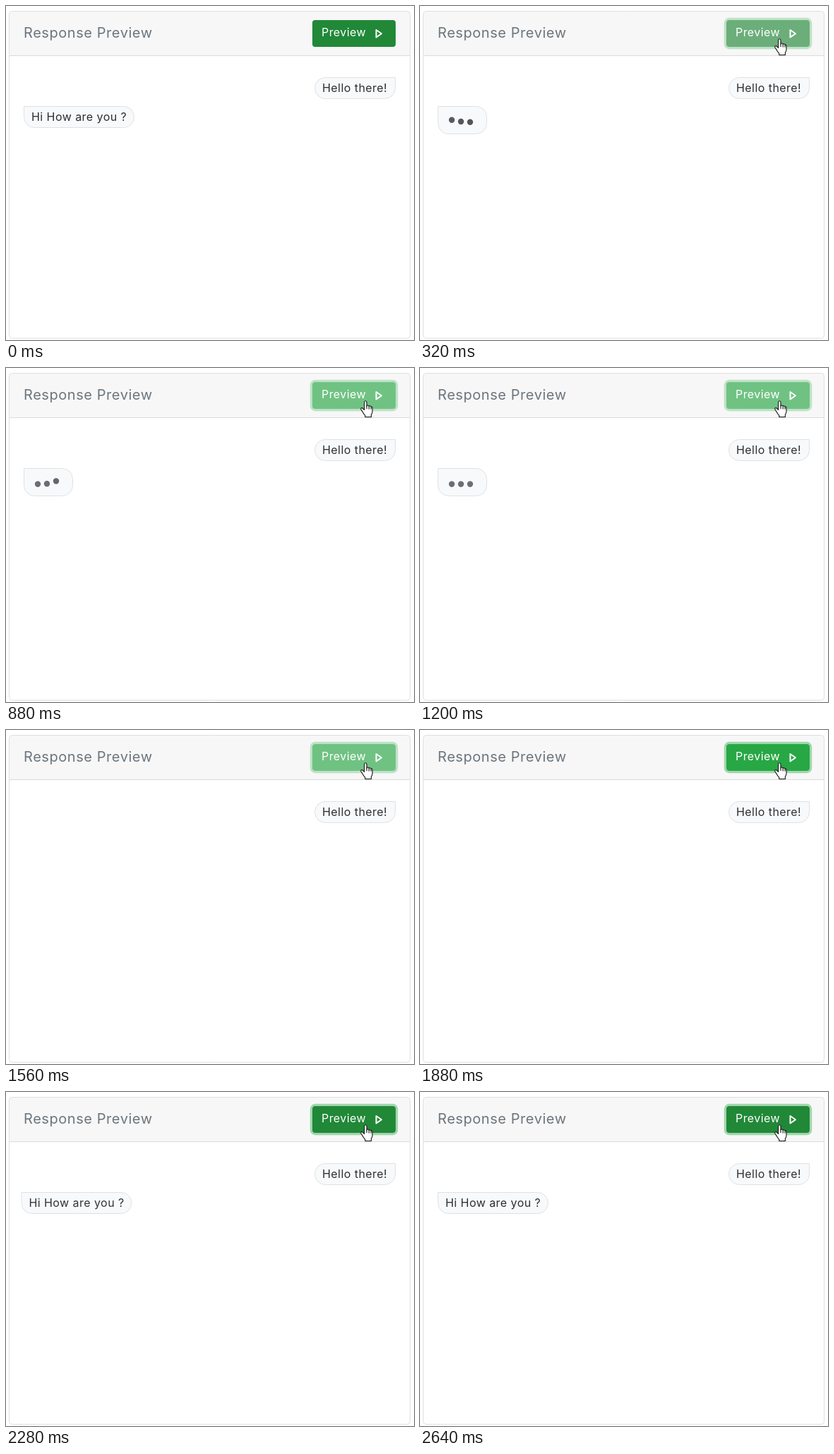
These frames come from a looping animation (578x474 px, 2680 ms). An HTML page with a canvas:

```html
<!DOCTYPE html>
<html lang="en">
<head>
<meta charset="utf-8">
<title>Response Preview</title>
<style>
  html, body { margin: 0; width: 578px; height: 474px; overflow: hidden; background: #fff; }
  canvas { display: block; }
</style>
</head>
<body>
<canvas id="stage" width="578" height="474"></canvas>
<script>
const ctx = document.getElementById('stage').getContext('2d');
const LOOP = 2680, CLICK = 40, DISABLED = 400, TYPED = 1520, REPLY = 1878;

const clamp = v => Math.min(1, Math.max(0, v));
const progress = (t, start, length) => clamp((t - start) / length);
const mix = (a, b, p) => `rgb(${a.map((v, i) => Math.round(v + (b[i] - v) * p))})`;

function bezier(x1, y1, x2, y2) {
  const at = (a, b, s) => 3 * a * s * (1 - s) ** 2 + 3 * b * s * s * (1 - s) + s ** 3;
  return x => {
    let low = 0, high = 1;
    for (let i = 0; i < 24; i++) {
      const mid = (low + high) / 2;
      if (at(x1, x2, mid) < x) low = mid; else high = mid;
    }
    return at(y1, y2, low);
  };
}
const ease = bezier(.25, .1, .25, 1);
const easeInOut = bezier(.42, 0, .58, 1);

function text(str, x, y, color, size = 16) {
  ctx.font = `${size}px Inter, sans-serif`;
  ctx.letterSpacing = size * .028 + 'px';
  ctx.fillStyle = color;
  ctx.fillText(str, x, y);
}

function box(x, y, w, h, radius, fill, stroke, lineWidth = 1) {
  ctx.beginPath();
  ctx.roundRect(x, y, w, h, radius);
  if (fill) { ctx.fillStyle = fill; ctx.fill(); }
  if (stroke) { ctx.strokeStyle = stroke; ctx.lineWidth = lineWidth; ctx.stroke(); }
}

const bubble = (x, y, w, h, radius) => box(x + .5, y + .5, w - 1, h - 1, radius, '#f8f9fa', '#dee2e6');

function drawCard() {
  box(4.5, 7.5, 568, 464, 4, '#fff');
  box(5, 8, 567, 62, [3, 3, 0, 0], '#f7f7f7');
  ctx.fillStyle = '#dadada';
  ctx.fillRect(5, 70, 567, 1);
  box(4.5, 7.5, 568, 464, 4, null, '#dfdfdf');
  text('Response Preview', 25, 45, '#6c757d', 20);
}

function drawButton(t) {
  const busy = t >= CLICK && t < REPLY;
  const light = ease(progress(t, DISABLED, 150)) - ease(progress(t, REPLY, 150));
  const focus = ease(progress(t, CLICK, 150));
  ctx.globalAlpha = busy ? .65 : 1;
  if (focus) box(432.4, 18.4, 121.2, 41.2, 5.6, null, `rgba(72,180,97,${focus / 2})`, 3.2);
  box(434, 20, 118, 38, 4, mix([33, 136, 56], [40, 167, 69], light));
  ctx.globalAlpha = 1;
  text('Preview', 447, 43, '#fff');
  ctx.strokeStyle = '#fff';
  ctx.lineWidth = 2;
  ctx.lineJoin = 'round';
  ctx.stroke(new Path2D('M524.5 34 L532 39.2 L524.5 44.4 Z'));
}

function drawTyping(t) {
  bubble(25, 142, 70, 40, [0, 15, 15, 15]);
  for (let i = 0; i < 3; i++) {
    const phase = Math.max(0, t - 120 - i * 100) / 1600;
    const up = easeInOut(progress(phase, 0, .28));
    const down = easeInOut(progress(phase, .28, .16));
    ctx.fillStyle = mix([84, 85, 88], [108, 110, 118], (up + down) / 2);
    ctx.beginPath();
    ctx.arc(45 + 13 * i, 164.7 - 7 * (up - down), 4.2, 0, 7);
    ctx.fill();
  }
}

function drawReply(p) {
  ctx.save();
  ctx.beginPath();
  ctx.rect(5, 71, 567, 400);
  ctx.clip();
  ctx.globalAlpha = p;
  ctx.translate(-157 * (1 - p), 0);
  bubble(25, 142, 157, 31, [0, 15, 15, 15]);
  text('Hi How are you ?', 36, 163, '#2b2f33');
  ctx.restore();
}

const hand = new Path2D(`M507.6 59.5 V48.8 q0-2 1.7-2 t1.7 2 V54 q.4-1.2 1.7-1 t1.5 1.4
  q.6-.9 1.6-.6 t1.2 1.4 q.7-.6 1.4 0 t.6 1.6 V62 q0 2.2-1.6 4.2 V69.5 H508.8 V67.4
  q-2.2-2.4-3.5-5 L503 59 q-.8-1.6 .4-2.2 t2.3 .6 Z`);
const fingers = new Path2D('M511 54 V58 M514.2 54.4 V58.4 M517 55.2 V58.6');

function drawHand() {
  ctx.fillStyle = '#fff';
  ctx.strokeStyle = '#111';
  ctx.lineWidth = 1.1;
  ctx.fill(hand);
  ctx.stroke(hand);
  ctx.stroke(fingers);
}

function draw(t) {
  ctx.fillStyle = '#fff';
  ctx.fillRect(0, 0, 578, 474);
  drawCard();
  drawButton(t);
  bubble(437, 101, 115, 31, [15, 0, 15, 15]);
  text('Hello there!', 448, 122, '#2b2f33');
  if (t < CLICK) drawReply(1);
  else if (t < TYPED) drawTyping(t);
  else if (t >= REPLY) drawReply(ease(progress(t, REPLY, 500)));
  if (t >= CLICK) drawHand();
}

const start = performance.now();
function tick() {
  draw((performance.now() - start) % LOOP);
  requestAnimationFrame(tick);
}
tick();
</script>
</body>
</html>
```
